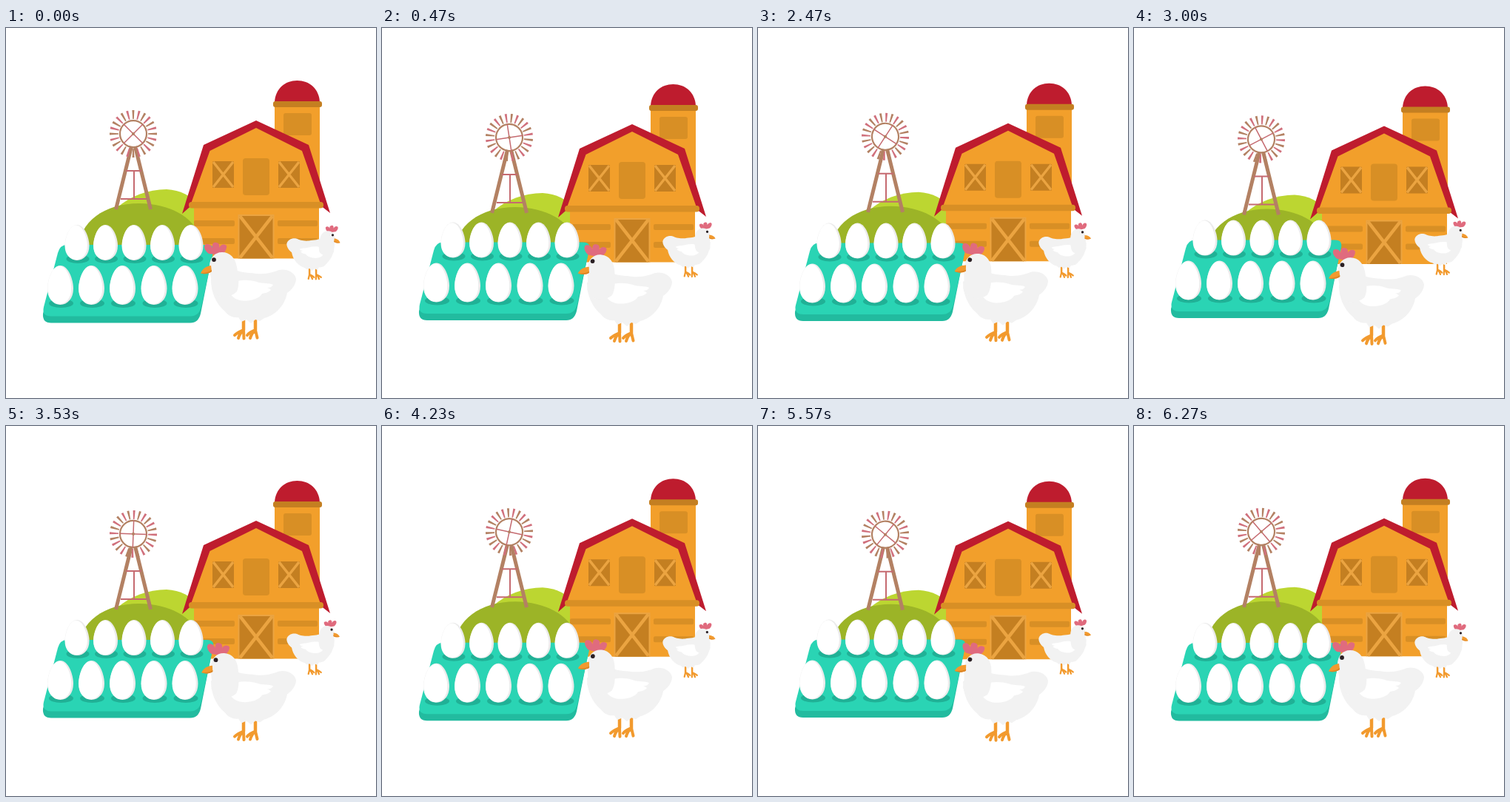
Recreate the animation shown at these times as an HTML page. Size 500 px wide and 500 px high, loop 6.31 s.

```html
<!DOCTYPE html>
<html lang="en">
<head>
<meta charset="utf-8">
<title>Egg farm</title>
<style>
  html, body { margin: 0; width: 100%; height: 100%; overflow: hidden; background: #fff; }
  svg { display: block; width: 100vw; height: 100vh; }
  .wall { fill: #f29f2b; }
  .trim { fill: #d88f25; }
  .dark { fill: #c47f21; }
  .roof { fill: #be1c2e; }
  .brace { fill: none; stroke: #eba441; }
  .mill { fill: none; stroke: #b38163; }
  .rose { fill: none; stroke: #c56a70; }
  .feather { fill: #f2f2f2; }
  .foot { fill: none; stroke: #f29a2e; stroke-linecap: round; stroke-linejoin: round; }
</style>
</head>
<body>
<svg viewBox="0 0 500 500">
  <g id="farm">
    <path fill="#bcd631" d="M150 295V243C168 227 192 218 217 218C236 219 249 226 262 240V295Z"/>
    <path fill="#9cb427" d="M96 300C100 262 132 237 180 237C222 238 250 254 262 280V300Z"/>

    <rect class="wall" x="363" y="103" width="61" height="140"/>
    <path class="roof" d="M363 100C364 82 377 71 393.500 71S423 82 424 100Z"/>
    <rect class="dark" x="361" y="99" width="66" height="8" rx="3"/>
    <rect class="trim" x="375" y="115" width="38" height="30" rx="3"/>

    <path class="roof" d="M238 251L267 158L338 125L409 158L438 250L420 236H255Z"/>
    <path class="wall" d="M249 240L275.500 166L338 135L400 166L426 240L423 242V311.500H254V242Z"/>
    <rect class="trim" x="247" y="235" width="182" height="8.500" rx="4"/>
    <rect class="trim" x="320" y="176" width="36" height="50" rx="4"/>
    <g id="planks" class="trim"></g>
    <g id="shutters"></g>

    <path class="mill" stroke-width="5" d="M169.500 160L148.500 245M174.500 160L195.500 245"/>
    <path class="rose" stroke-width="2" d="M162 193H183M155 231H190M173 193V231"/>
    <g id="wheel">
      <g id="blades"></g>
      <circle class="mill" r="18" stroke-width="2.200"/>
      <path class="rose" stroke-width="1.500" d="M-13 -13L13 13M-13 13L13 -13"/>
      <circle r="2" fill="#b38163"/>
    </g>
  </g>

  <g id="tray">
    <path fill="#22bb9f" d="M84 297H271Q281 297 279 306L263 386Q260 398.500 249 398.500H61Q49 398.500 50 386L70 308Q73 297 84 297Z"/>
    <path fill="#2ad4b4" d="M82 293H272Q282 293 280 303L264 376Q261 389.500 249 389.500H61Q48 389.500 51 377L70 304Q73 293 82 293Z"/>
    <g id="eggs"></g>
  </g>

  <g id="small"></g>
  <g id="big"></g>
</svg>
<script>
const LOOP = 6310, BOB = LOOP / 3, NOD = LOOP / 4;
const $ = id => document.getElementById(id);

// `plump` stretches the body upwards from its base
function hen(plump) {
  return `
    <path class="foot" stroke-width="4.500" d="M321 394V408M337 394V408"/>
    <path class="foot" stroke-width="4" d="M309 415Q313 411 321 408Q316 412 314 419
      M321 408L321.500 419.500M326 415Q329 411 337 408Q332 412 330 419M337 408L339.500 418.500"/>
    <path class="feather" transform="translate(0 395) scale(1 ${plump}) translate(0 -395)"
      d="M277 340C277 356 283 372 296 383C300 389 308 392 314 391L318 397L325 394
      L331 399L337 394L343 396L349 392C365 388 377 374 380 358C387 353 392 346 392 339
      C390 329 378 325 369 327C360 330 354 333 338 332C326 330 313 331 309 325Z"/>
    <path fill="#fff" d="M302 353C302 341 321 338 339 343C347 346 355 344 361 347
      C359 350 357 351 353 351C356 352 357 353 358 354C354 358 350 358 346 359
      C342 367 326 370 316 368C306 365 302 360 302 353Z"/>
    <g class="head">
      <path fill="#e06b7e" d="M274 305C267 300 266 292 272 292C276 292 278 295 279 297
        C278 291 281 289 284 290C288 290 289 294 288 297C290 292 295 291 298 294
        C299 299 295 304 291 307Z"/>
      <path class="feather" d="M278 352C279 341 275 332 275 322C275 311 282 303 292 303
        C303 303 310 311 312 323C314 336 316 347 312 356C300 368 282 364 278 352Z"/>
      <path fill="#f29a2e" d="M277 321C270 322 265 326 263 331.500C268 333 275 332 278 329Z"/>
      <path fill="#dc8424" d="M263 331.500C269 331 274 330 278 327V329C275 332 268 333 263 331.500Z"/>
      <circle class="open" cx="281" cy="313" r="2.900" fill="#2b2024"/>
      <path class="shut" d="M278 313Q282 311.500 285.500 313" fill="none" stroke="#4a3d40"
        stroke-width="1.300" visibility="hidden"/>
    </g>`;
}

function egg(x, y, rx, ry) {
  const shape = (cx, w, h) => {
    const top = y - h, mid = y + h * .18;
    return `M${cx} ${top}C${cx + w * .6} ${top} ${cx + w} ${y - h * .3} ${cx + w} ${mid}
      C${cx + w} ${y + h * .68} ${cx + w * .55} ${y + h} ${cx} ${y + h}
      C${cx - w * .55} ${y + h} ${cx - w} ${y + h * .68} ${cx - w} ${mid}
      C${cx - w} ${y - h * .3} ${cx - w * .6} ${top} ${cx} ${top}Z`;
  };
  return `<ellipse cx="${x + 1}" cy="${y + ry - 2}" rx="${rx - 1}" ry="6" fill="#20b196"/>
    <path d="${shape(x, rx, ry)}" fill="#ebebeb"/>
    <path d="${shape(x - 1.2, rx - 1.5, ry - .7)}" fill="#fff"/>`;
}

function shutter(x, y, w, h, line) {
  const r = x + w, b = y + h;
  return `<rect class="dark" x="${x}" y="${y}" width="${w}" height="${h}" rx="1.500"/>
    <path class="brace" stroke-width="${line}" d="M${x + 1} ${y + 1}L${r - 1} ${b - 1}M${r - 1} ${y + 1}L${x + 1} ${b - 1}"/>`;
}

$('eggs').innerHTML =
  [96, 134.5, 173, 211.5, 250].map(x => egg(x, 290, 16.5, 24)).join('') +
  [73.5, 115.5, 157.5, 200, 242].map(x => egg(x, 347.5, 17.5, 26.5)).join('');

$('planks').innerHTML = [260, 284].map(y =>
  `<rect x="254" y="${y}" width="55" height="8" rx="2"/>
   <rect x="367" y="${y}" width="54" height="8" rx="2"/>`).join('');

$('shutters').innerHTML =
  shutter(279, 180, 29, 36, 3.5) + shutter(368, 180, 29, 36, 3.5) +
  shutter(315, 253, 46, 58.5, 4.5) +
  '<path class="brace" stroke-width="2" d="M314.500 311.500V253H361.500V311.500"/>';

$('blades').innerHTML = Array.from({ length: 24 }, (_, i) =>
  `<path d="M-.8 -20L-1.500 -32H1.500L.8 -20Z" fill="${i % 2 ? '#d0707c' : '#b38163'}"
    transform="rotate(${i * 15})"/>`).join('');

$('big').innerHTML = hen(1);
$('small').innerHTML = hen(1.08);
const heads = document.querySelectorAll('.head');
const openEye = $('big').querySelector('.open');
const shutEye = $('big').querySelector('.shut');

// Smooth swing from 0 to 1 and back
const swing = (t, period) => (1 - Math.cos(2 * Math.PI * t / period)) / 2;
const move = (id, text) => $(id).setAttribute('transform', text);

function draw(t) {
  const farm = 8 * swing(t + 190, BOB) - .6;
  const bob = swing(t + 78, BOB);
  const lift = -6.5 * bob;
  move('farm', `translate(0 ${farm})`);
  move('wheel', `translate(172 143) rotate(${-720 * t / LOOP})`);
  move('tray', `translate(0 ${lift})`);
  move('big', `translate(0 ${7.5 * bob})`);
  move('small', `translate(451 ${267 + lift}) scale(-.56 .56) translate(-264 -290)`);

  const nod = 9.5 * swing(t, NOD);
  heads.forEach(h => h.setAttribute('transform', `rotate(${nod} 300 345)`));

  const p = t % BOB, closed = p > 600 && p < 730;
  openEye.setAttribute('visibility', closed ? 'hidden' : 'visible');
  shutEye.setAttribute('visibility', closed ? 'visible' : 'hidden');
}

const start = performance.now();
function tick() {
  draw((performance.now() - start) % LOOP);
  requestAnimationFrame(tick);
}
tick();
</script>
</body>
</html>
```
